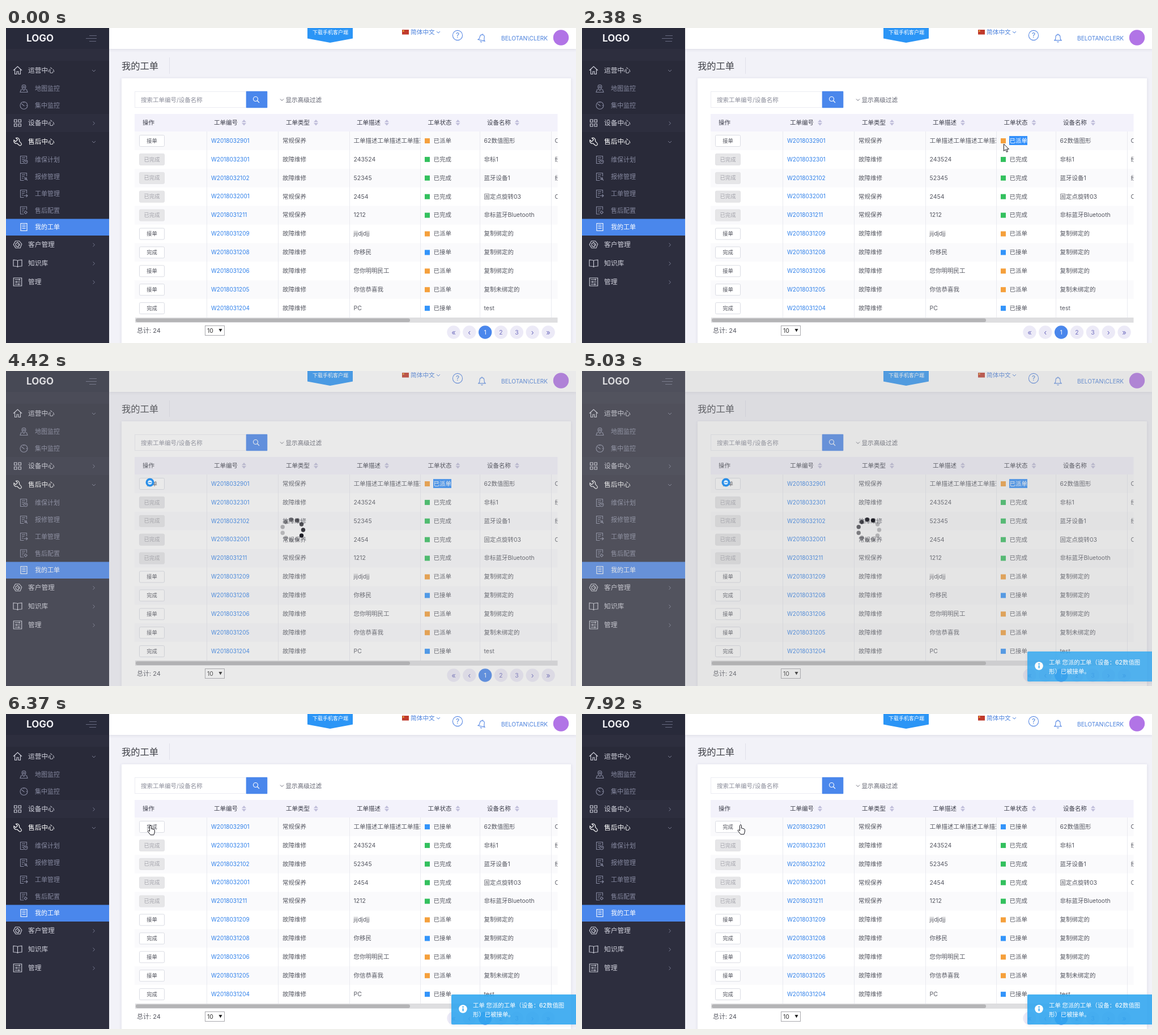
Recreate the animation shown at these times as an HTML page. Size 1006 by 557 pixels, loop 7.99 s.

```html
<!DOCTYPE html>
<html lang="zh-CN">
<head>
<meta charset="utf-8">
<title>我的工单</title>
<style>
html, body { margin: 0; width: 100%; height: 100%; overflow: hidden; background: #f2f2f8; }
svg { display: block; width: 1006px; height: 557px; }
text { font-family: Inter, 'Noto Sans CJK SC', 'Noto Sans CJK', sans-serif; white-space: pre; }
</style>
</head>
<body>
<svg id="stage" viewBox="0 0 1006 557"></svg>
<script>
const LOOP = 7990;
const BLUE = '#4a87ec';
const STATUS = { 已派单: '#f5a03c', 已完成: '#33c05e', 已接单: '#3394fa' };

const rect = (x, y, w, h, fill, extra = '') =>
  `<rect x="${x}" y="${y}" width="${w}" height="${h}" fill="${fill}" ${extra}/>`;
const circle = (x, y, r, fill, extra = '') =>
  `<circle cx="${x}" cy="${y}" r="${r}" fill="${fill}" ${extra}/>`;
const line = (d, color, width = 1, extra = '') =>
  `<path d="${d}" fill="none" stroke="${color}" stroke-width="${width}" ${extra}/>`;
// Text is placed by its vertical centre.
const text = (x, cy, size, str, fill, extra = '') =>
  `<text x="${x}" y="${(cy + size * 0.37).toFixed(2)}" font-size="${size}" fill="${fill}" ${extra}>${str}</text>`;
const middle = 'text-anchor="middle"';
const chevron = (x, y, turn, color, s = 3) =>
  line(`M${-s} ${-s / 2}L0 ${s / 2}L${s} ${-s / 2}`, color, 1, `transform="translate(${x} ${y}) rotate(${turn})"`);

// Icons are drawn around their own centre.
const sheet = 'M5-1V-6.5H-6V6.5H0M-3.5-3.5H2.5M-3.5-.5H1M-3.5 2.5H-1';
const icons = {
  home: 'M-7.5 0L0-7L7.5 0M-5-2V6.5H-1.5V2H1.5V6.5H5V-2',
  pin: 'M0 3.5C-5-2-4-6.5 0-6.5S5-2 0 3.5ZM-1.5-2.5a1.5 1.5 0 1 0 3 0a1.5 1.5 0 1 0-3 0M-3 2H-5L-6.5 6.5H6.5L5 2H3',
  gauge: 'M-6.5 0a6.5 6.5 0 1 0 13 0a6.5 6.5 0 1 0-13 0M-4-3L1 1M0-6V-4.5M4 0H6',
  grid: 'M-6-6H-1.5V-1.5H-6ZM1.5-6H6V-1.5H1.5ZM-6 1.5H-1.5V6H-6ZM1.5 1.5H6V6H1.5Z',
  wrench: 'M-3-6.5L0-3.5L-3.5 0L-6.5-3C-7.5 2-3.5 4-1 3L3 6.5C5 8 8 5 6.5 3L3-1C4-5 0-8-3-6.5Z',
  plan: sheet + 'M0 3.5a3.2 3.2 0 1 0 6.4 0a3.2 3.2 0 1 0-6.4 0M3.2 1.5V3.5H5',
  repair: sheet + 'M1 1L6.5 6.5M1 3.5a2 2 0 1 0 2.5-2.5',
  orders: sheet + 'M0 3.5H6.5M4 1L6.5 3.5L4 6',
  config: sheet + 'M1.2 3.5a2 2 0 1 0 4 0a2 2 0 1 0-4 0M3.2 .2V1.5M3.2 5.5V6.8M0 3.5H1.2M5.2 3.5H6.5',
  list: 'M-5.5-6.5H5.5V6.5H-5.5ZM-3-3.5H3M-3-.5H3M-3 2.5H3',
  clients: 'M-4-6.3H3L7.3-1L4.5 6H-3.5L-7.3 0ZM-3.5-1.5L0-4L4 0L1 4L-3 2.5ZM0-1L2 1.5',
  book: 'M0-4.5C-2-6-5-6-7.5-6V5C-5 5-2 5 0 6.5C2 5 5 5 7.5 5V-6C5-6 2-6 0-4.5V6.5',
  panel: 'M-7.2-7H7.2V7H-7.2ZM-5-4H5M-5 0H5M-5 4H5M3-5.5V-2.5M-2-1.5V1.5M2 2.5V5.5'
};
const icon = (name, x, y, color) => line(icons[name], color, 1.1, `transform="translate(${x} ${y})"`);

function sidebar() {
  const w = 182;
  let s = rect(0, 0, w, 557, '#2d2e3e') + rect(0, 0, w, 37, '#282a3a') +
    rect(0, 58, w, 94, '#292a39') + rect(0, 184, w, 183, '#292a39') +
    rect(0, 337.5, w, 29.5, BLUE) +
    text(36, 17.5, 17, 'LOGO', '#f0f0f4', 'font-weight="700"') +
    line('M147 13.5H160M141 18.5H160M147 23.5H159', '#676a80', 1.1);
  const top = [['home', '运营中心', 75, 0], ['grid', '设备中心', 168, -90], ['wrench', '售后中心', 201, 0],
    ['clients', '客户管理', 383, -90], ['book', '知识库', 416, -90], ['panel', '管理', 449, -90]];
  for (const [name, label, y, turn] of top) {
    const color = name === 'wrench' ? '#fff' : '#d0d1dc';
    s += icon(name, 20.5, y, color) + text(39, y, 11.7, label, color, name === 'wrench' ? 'font-weight="500"' : '') +
      chevron(155, y + .5, turn, '#777a90');
  }
  const sub = [['pin', '地图监控', 107], ['gauge', '集中监控', 137], ['plan', '维保计划', 233], ['repair', '报修管理', 263],
    ['orders', '工单管理', 293], ['config', '售后配置', 322.5], ['list', '我的工单', 352]];
  for (const [name, label, y] of sub) {
    const color = name === 'list' ? '#fff' : '#85889f';
    s += icon(name, 31.5, y, color) + text(51, y, 11, label, color, name === 'list' ? 'font-weight="500"' : '');
  }
  return s;
}

function header() {
  const bell = 'M-5.5 4.5C-4 2.5-4 1-4-1C-4-4-2-5.5 0-5.5S4-4 4-1C4 1 4 2.5 5.5 4.5ZM-7 4.5H7M0-5.5V-7.5M-1.5 6.5C-1 7.8 1 7.8 1.5 6.5';
  return rect(181, 0, 825, 37, '#fff', 'filter="url(#soft)"') +
    '<path d="M532 0H612V18.5L572 26L532 18.5Z" fill="#2b95f6"/>' +
    text(572.5, 7.8, 9, '下载手机客户端', '#fff', middle + ' font-weight="500"') +
    rect(699, 3, 12, 8.5, '#c03a2c') + circle(701.5, 5.2, 1.2, '#f0c63c') +
    text(714, 7.5, 10.7, '简体中文', '#4a80dc') + chevron(763, 7.5, 0, '#4a80dc') +
    circle(797, 13, 8.6, 'none', 'stroke="#5a8ae4" stroke-width="1.1"') +
    text(797, 13, 12, '?', '#4a80dc', middle) +
    `<g transform="translate(840 17.4)"><g id="bell">${line(bell, '#5a8ae4', 1.1)}</g></g>` +
    text(874, 18, 10.2, 'BELOTAN\\CLERK', '#4a80dc') +
    circle(979.5, 17, 13.7, '#b174e6');
}

const button = (y, label) => {
  const off = label === '已完成';
  return rect(235.5, y - 10, 44, 20, off ? '#e6e6e8' : '#fff', `rx="2" stroke="${off ? '#e2e2e5' : '#dadce3'}"`) +
    text(257.5, y - .3, 9.3, label, off ? '#a2a2aa' : '#4c4e58', middle);
};
const state = (y, label) =>
  rect(739, y - 4, 9, 9, STATUS[label]) + text(754.5, y, 10.5, label, '#565862');

function table() {
  const heads = [['操作', 241], ['工单编号', 367], ['工单类型', 494], ['工单描述', 619], ['工单状态', 744.5], ['设备名称', 849]];
  const rows = [
    ['接单', '32901', '常规保养', '工单描述工单描述工单描述', '已派单', '62数值图形', 'C'],
    ['已完成', '32301', '故障维修', '243524', '已完成', '非标1', '经'],
    ['已完成', '32102', '故障维修', '52345', '已完成', '蓝牙设备1', '经'],
    ['已完成', '32001', '常规保养', '2454', '已完成', '固定点旋转03', 'C'],
    ['已完成', '31211', '常规保养', '1212', '已完成', '非标蓝牙Bluetooth', ''],
    ['接单', '31209', '故障维修', 'jijdjdjj', '已派单', '复制绑定的', ''],
    ['完成', '31208', '故障维修', '你移民', '已接单', '复制绑定的', ''],
    ['接单', '31206', '故障维修', '您你明明民工', '已派单', '复制绑定的', ''],
    ['接单', '31205', '故障维修', '你信恭喜我', '已派单', '复制未绑定的', ''],
    ['完成', '31204', '故障维修', 'PC', '已接单', 'test', '']
  ];
  let s = rect(227, 152, 746.5, 31, '#f3f2fb');
  heads.forEach(([label, x], i) => {
    s += text(x, 167.5, 10.5, label, '#3c3e4a', 'font-weight="500"');
    if (i) s += `<path d="M${x + 49} 166.5l4-4.5l4 4.5zM${x + 49} 168l4 4.5l4-4.5z" fill="#bfbdda"/>`;
  });
  rows.forEach(([action, id, type, note, status, device, tail], i) => {
    const y = 199 + 32.9 * i;
    if (i % 2 === 0) s += rect(227, y - 16, 746.5, 32.9, '#fafafc');
    s += text(362, y, 10, 'W20180' + id, '#2f80ea') + text(488, y, 10.5, type, '#565862') +
      text(613.5, y, 10.5, note, '#565862', 'clip-path="url(#note)"') +
      text(843.5, y, 10.5, device, '#565862') + text(968.5, y, 10.5, tail, '#565862', 'clip-path="url(#table)"');
    if (i) s += button(y + .5, action) + state(y, status);
  });
  for (const x of [354, 480, 606, 731, 836, 962]) s += rect(x, 183, 1, 329, '#e9eaf0');
  return s + `<g id="before">${button(199.5, '接单') + state(199, '已派单')}</g>` +
    `<g id="after">${button(199.5, '完成') + state(199, '已接单')}</g>` +
    '<clipPath id="chosen"><rect id="range" y="191" height="16"/></clipPath>' +
    `<g clip-path="url(#chosen)">${rect(754, 191, 32, 16, '#3390fb') + text(754.5, 199, 10.5, '已派单', '#fff')}</g>` +
    rect(228, 512, 745.5, 9, '#dedee0') + rect(229, 513.5, 484, 6.5, '#b4b4b6', 'rx="3"');
}

function page() {
  let s = text(204, 67, 16.3, '我的工单', '#3f4047') + rect(288, 52, 1, 29, '#e0e1ea') +
    rect(204, 89, 793, 480, '#fff', 'filter="url(#soft)"') +
    rect(227.5, 112.5, 197, 28, '#fff', 'stroke="#ebecf2"') +
    text(238, 127, 10.5, '搜索工单编号/设备名称', '#8b8d9a') +
    rect(423.7, 111.7, 37.6, 29.6, BLUE, 'rx="1"') +
    line('M436.5 125.5a4 4 0 1 0 8 0a4 4 0 1 0-8 0M443.5 128.5L447 132', '#fff', 1.1) +
    chevron(487, 127, 0, '#6b6d7a') + text(493.5, 127, 10.6, '显示高级过滤', '#5f616e') +
    table() + text(231, 535, 11, '总计: 24', '#565862') +
    rect(351.5, 526.5, 34, 17, '#fff', 'stroke="#a9a9ae"') + text(355, 535, 10.5, '10', '#333') +
    '<path d="M375.5 532h6l-3 5.5z" fill="#222"/>';
  ['«', '‹', '1', '2', '3', '›', '»'].forEach((label, i) => {
    const x = 790 + 27.85 * i, on = label === '1';
    s += circle(x, 538, 11.7, on ? BLUE : '#eceaf7') +
      text(x, 538, /\d/.test(label) ? 10.5 : 13, label, on ? '#fff' : '#7472c0', middle);
  });
  return s;
}

const spinner = () => Array.from({ length: 11 }, (_, i) => {
  const a = i * 2 * Math.PI / 11;
  return circle(506 + 18.5 * Math.cos(a), 281 + 18.5 * Math.sin(a), 3.7, '#1a1a22', 'class="dot"');
}).join('');

const toast = () =>
  rect(786, 496, 224, 53, '#2fa8f2', 'rx="2" fill-opacity=".88" filter="url(#soft)"') +
  circle(806.5, 521.5, 7.3, '#fff') + rect(805.6, 520.5, 2, 5, '#2fa8f2') + circle(806.6, 518, 1.2, '#2fa8f2') +
  text(824, 515.5, 10.4, '工单 您派的工单（设备：62数值图', '#fff', 'font-weight="500"') +
  text(824, 531, 10.4, '形）已被接单。', '#fff', 'font-weight="500"');

const outline = 'fill="#fff" stroke="#15151c" stroke-width="1" stroke-linejoin="round"';
const cursors = {
  arrow: `<path d="M0 0V12.5L3 9.8L5 14.3L7 13.4L5.1 9.1H9Z" ${outline}/>`,
  beam: line('M-2.5-7.5H-.7L0-7L.7-7.5H2.5M0-7V7M-2.5 7.5H-.7L0 7L.7 7.5H2.5', '#222'),
  hand: `<path d="M-1.5 1.5a1.5 1.5 0 0 1 3 0V6l2.2.4 2.2.6 1.4 1.2V12L5.8 16.8H0L-4.6 10.8c-.9-1.5.6-2.5 1.8-1.4L-1.5 10.5Z" ${outline}/>`,
  busy: circle(-1, 0, 5.6, '#e4f2fe', 'stroke="#2b8fe8" stroke-width="3.8"') +
    line('M-3.5 .3H1.5', '#2b8fe8', 1.3)
};

const stage = document.getElementById('stage');
stage.innerHTML = `<defs>
  <filter id="soft" x="-10%" y="-20%" width="120%" height="140%"><feDropShadow dx="0" dy="1" stdDeviation="2.5" flood-color="#45406a" flood-opacity=".14"/></filter>
  <clipPath id="note"><rect x="606" y="183" width="125.5" height="330"/></clipPath>
  <clipPath id="table"><rect x="227" y="152" width="746.5" height="361"/></clipPath></defs>` +
  rect(0, 0, 1006, 557, '#f2f2f8') + header() + page() + sidebar() +
  rect(0, 0, 1006, 557, '#aaa', 'id="veil"') + `<g id="spinner">${spinner()}</g><g id="toast">${toast()}</g>` +
  '<g id="cursor">' + Object.entries(cursors).map(([k, v]) => `<g id="${k}">${v}</g>`).join('') + '</g>';

const el = id => document.getElementById(id);
const dots = [...document.querySelectorAll('.dot')];
const show = (id, on) => el(id).setAttribute('visibility', on ? 'visible' : 'hidden');
const fade = (id, v) => el(id).setAttribute('opacity', v);
const ramp = (t, a, b) => Math.min(1, Math.max(0, (t - a) / (b - a)));

const path = [[70, 917, 532], [840, 788, 194], [1000, 785, 199], [1770, 785, 199], [2150, 757, 199], [2379, 757, 199],
  [2380, 745, 205], [2760, 520, 224], [3170, 276, 212], [3240, 270, 210], [3550, 255, 197],
  [6500, 255, 197], [6800, 278, 196], [7750, 278, 196], [7920, 280, 196]];
const kinds = [[70, 'arrow'], [960, 'beam'], [2380, 'arrow'], [3200, 'hand'], [4290, 'busy'], [5400, 'hand']];

function along(t) {
  const i = path.findIndex(p => p[0] > t);
  if (i < 0) return path[path.length - 1].slice(1);
  if (i === 0) return path[0].slice(1);
  const [t0, x0, y0] = path[i - 1], [t1, x1, y1] = path[i], k = (t - t0) / (t1 - t0);
  return [x0 + (x1 - x0) * k, y0 + (y1 - y0) * k];
}

function bellAngle(t) {
  const peak = t < 2150 ? 0 : 6370;
  const ringing = t < 2150 || t >= 5150;
  return ringing ? 13 * Math.cos((t - peak) * Math.PI / 100) : 0;
}

function render(t) {
  el('bell').setAttribute('transform', `rotate(${bellAngle(t)})`);

  const [x, y] = along(t);
  el('cursor').setAttribute('transform', `translate(${x} ${y})`);
  const kind = kinds.filter(k => k[0] <= t).pop();
  for (const name in cursors) show(name, kind && kind[1] === name);

  const done = t >= 5700;
  show('before', !done);
  show('after', done);
  const from = 786 - 32 * ramp(t, 1770, 2150);
  el('range').setAttribute('x', from);
  el('range').setAttribute('width', done ? 0 : 786 - from);

  const leave = 1 - ramp(t, 5200, 5400);
  fade('veil', .3 * ramp(t, 4295, 4450) * leave);
  fade('spinner', t < 4320 ? 0 : leave);
  const head = (t - 4330) / 76;
  dots.forEach((dot, i) => {
    const age = (((head - i) % 11) + 11) % 11 / 11;
    dot.setAttribute('opacity', Math.max(.25, 1 - .75 * age / .6));
  });
  fade('toast', ramp(t, 4800, 5050));
}

const start = performance.now();
function tick() {
  render((performance.now() - start) % LOOP);
  requestAnimationFrame(tick);
}
tick();
</script>
</body>
</html>
```
